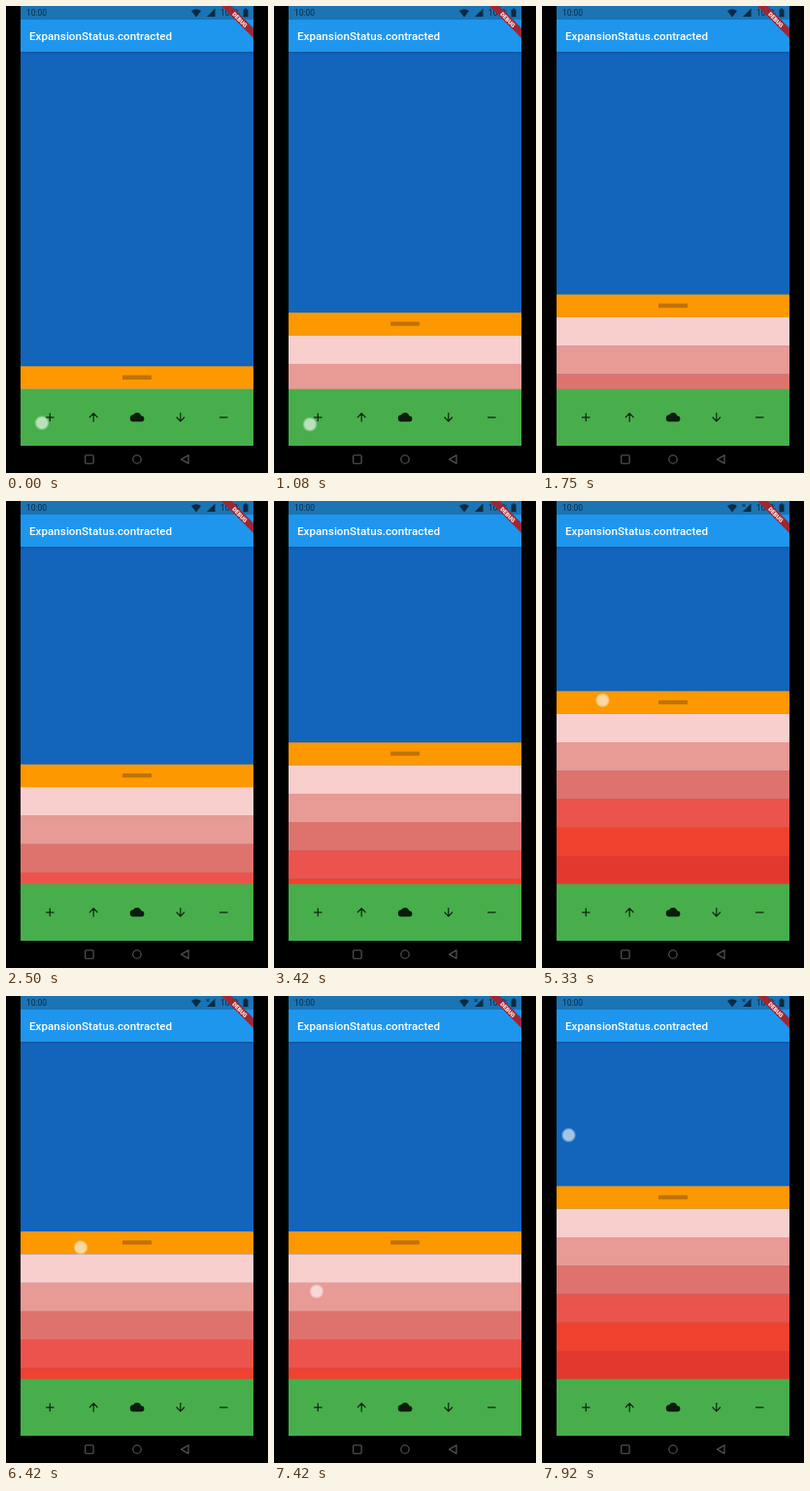
An HTML page that plays this animation: 270 by 480 pixels, repeating every 8 s.

```html
<!DOCTYPE html>
<html lang="en">
<head>
<meta charset="utf-8">
<title>Bottom sheet</title>
<style>
  html, body { margin: 0; height: 100%; overflow: hidden; background: #000; }
  svg { display: block; width: 100vw; height: 100vh; }
  text { font-family: Roboto, sans-serif; }
  .line { fill: none; stroke: #102412; stroke-width: 1.2; }
  .nav { fill: none; stroke: #5c5c5c; stroke-width: 1.1; stroke-linejoin: round; }
</style>
</head>
<body>
<svg viewBox="0 0 270 480">
  <defs>
    <linearGradient id="shade" x2="0" y2="1">
      <stop stop-color="#0b4488" stop-opacity=".5"/>
      <stop offset="1" stop-color="#0b4488" stop-opacity="0"/>
    </linearGradient>
    <radialGradient id="glow">
      <stop offset=".7" stop-color="#fff" stop-opacity=".62"/>
      <stop offset="1" stop-color="#fff" stop-opacity=".1"/>
    </radialGradient>
    <clipPath id="screen"><rect x="15" width="240" height="452"/></clipPath>
  </defs>

  <g clip-path="url(#screen)">
    <rect x="15" width="240" height="452" fill="#1265bb"/>
    <rect x="15" y="47" width="240" height="3" fill="url(#shade)"/>
    <rect x="15" width="240" height="47" fill="#1e96ee"/>
    <rect x="15" width="240" height="14" fill="#1b74b4"/>
    <text x="24" y="34.5" font-size="11.68" font-weight="500" fill="#fff">ExpansionStatus.contracted</text>

    <g fill="#0a2a42">
      <text x="21" y="10" font-size="8.4">10:00</text>
      <path d="M191 5Q196 1.6 201 5L196 11.4Z"/>
      <path d="M207 11L215.500 2.500V11Z"/>
      <text x="221" y="10" font-size="8.4">100%</text>
      <path d="M244.500 3.500H246V2.500H248V3.500H249.500V11.300H244.500Z"/>
      <path id="noSignal" d="M206.500 3L209.500 6M209.500 3L206.500 6" stroke="#0a2a42"/>
    </g>

    <g transform="translate(241 14) rotate(45)">
      <rect x="-30" y="-3.800" width="60" height="7.400" fill="#9f2632"/>
      <text y="2.200" font-size="6" font-weight="900" text-anchor="middle" fill="#fff">DEBUG</text>
    </g>

    <g id="sheet">
      <rect x="15" width="240" height="23.400" fill="#fd9800"/>
      <rect x="120" y="9.300" width="30" height="4.300" rx=".6" fill="#bf7306"/>
    </g>

    <rect x="15" y="393.700" width="240" height="59" fill="#47ae4b"/>
    <path class="line" d="M41 422.800H49.500M45.300 418.500V427
      M90.200 427.500V419M86 423L90.200 418.700L94.400 423
      M179.800 418V426.500M175.600 422.500L179.800 426.800L184 422.500
      M220 422.800H228.500"/>
    <path fill="#0b1c0d" d="M131.500 427.300a3.500 3.500 0 0 1-.4-7a4.400 4.400 0 0 1 8.200 1a3 3 0 0 1 .2 6Z"/>
  </g>

  <rect class="nav" x="81.700" y="461.800" width="8.400" height="8.400" rx="1"/>
  <circle class="nav" cx="135" cy="466" r="4.200"/>
  <path class="nav" d="M180.500 466L188 461.700V470.300Z"/>
  <circle id="touch" r="7.500" fill="url(#glow)"/>
</svg>

<script>
const LOOP = 8000;
const ROW = 29.2, HEADER = 23.4, FLOOR = 393.7;
const CONTRACTED = 242, EXPANDED = 195.4, GRIP = 16;
const rowColors = ['#f9cfce', '#e89a95', '#de736d', '#ea544d', '#f0422f', '#e2392f'];

const sheet = document.getElementById('sheet');
const touch = document.getElementById('touch');
const noSignal = document.getElementById('noSignal');

rowColors.forEach((fill, i) => {
  const row = document.createElementNS(sheet.namespaceURI, 'rect');
  const attrs = { x: 15, y: HEADER + i * ROW, width: 240, height: ROW + .3, fill };
  for (const key in attrs) row.setAttribute(key, attrs[key]);
  sheet.append(row);
});

// Each tap grows the sheet by one row: [start, end].
const growth = [[60, 540], [545, 1150], [1420, 2050], [2245, 2870], [3170, 3720]];
const taps = [[0, 160], [300, 610], [1050, 1480], [1900, 2300], [2820, 3230], [3720, 4120]];

// Finger paths: [time, x, y].
const drags = [
  [[5080, 60, 258], [5330, 62.5, 205], [5500, 64, 170], [5670, 64, 169]],
  [[6000, 70, 210], [6150, 71, 214], [6420, 77, 258], [6750, 74, 405], [6900, 68, 418],
   [7050, 60, 410], [7580, 37, 258], [7670, 34, 225], [7920, 27.5, 143], [8000, 27.5, 140]]
];

const clamp = (v, lo, hi) => Math.min(hi, Math.max(lo, v));

function along(path, t) {
  const i = path.findIndex(p => p[0] > t);
  if (i < 1) return path[path.length - 1].slice(1);
  const [a, b] = [path[i - 1], path[i]];
  const k = (t - a[0]) / (b[0] - a[0]);
  return [a[1] + (b[1] - a[1]) * k, a[2] + (b[2] - a[2]) * k];
}

function grownTop(t) {
  return growth.reduce((top, [start, end]) => {
    const next = Math.max(CONTRACTED, top - ROW);
    return top + (next - top) * clamp((t - start) / (end - start), 0, 1);
  }, FLOOR - HEADER);
}

function draw(t) {
  const drag = drags.find(d => t >= d[0][0] && t < d[d.length - 1][0]);
  const tap = taps.find(([start, end]) => t >= start && t < end);
  let finger = null, top = t < 5080 ? grownTop(t) : EXPANDED;

  if (drag) {
    finger = along(drag, t);
    top = clamp(finger[1] - GRIP, EXPANDED, CONTRACTED);
  } else if (tap) {
    finger = [37, t < 200 ? 428.5 : 430];
  }

  sheet.setAttribute('transform', `translate(0 ${top})`);
  touch.style.display = finger ? '' : 'none';
  if (finger) touch.setAttribute('transform', `translate(${finger})`);
  noSignal.style.display = t > 4160 ? '' : 'none';
}

const began = performance.now();
function tick() {
  draw((performance.now() - began) % LOOP);
  requestAnimationFrame(tick);
}
tick();
</script>
</body>
</html>
```
